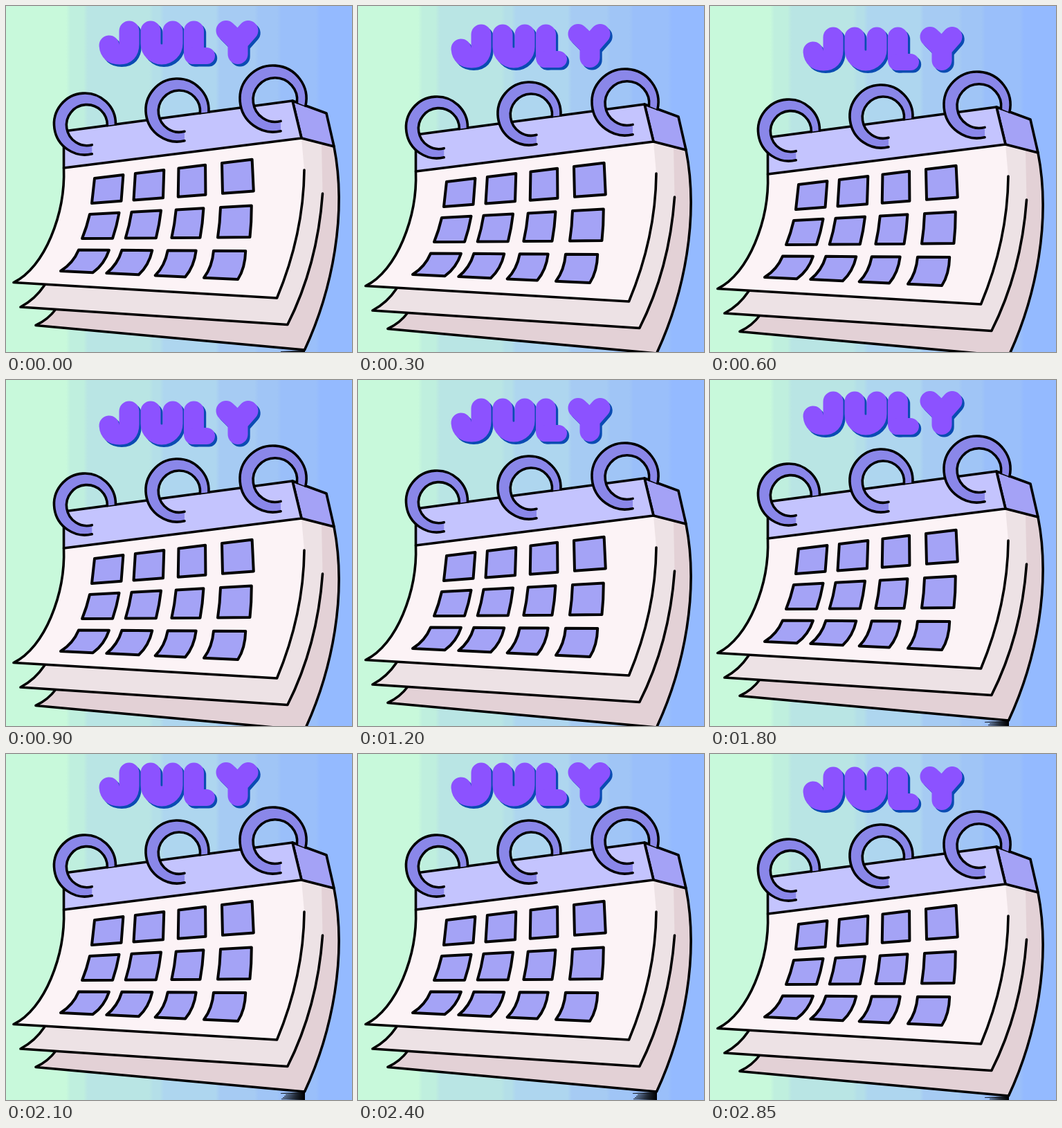
An HTML page that plays this animation: 500 by 500 pixels, repeating every 3 s.

```html
<!DOCTYPE html>
<html lang="en">
<head>
<meta charset="utf-8">
<title>July calendar</title>
<style>
html, body { margin: 0; width: 100%; height: 100%; overflow: hidden; }
svg { display: block; width: 100vw; height: 100vh; }
.ink { stroke: #000; stroke-width: 3.6; stroke-linejoin: round; stroke-linecap: round; }
.line { fill: none; }
.thick { stroke-width: 4; }
.word { fill: none; stroke-width: 29; stroke-linecap: round; stroke-linejoin: round; }
</style>
</head>
<body>
<svg viewBox="0 0 500 500" role="img" aria-label="July calendar">
  <defs>
    <linearGradient id="sky"></linearGradient>
    <g id="july" class="word">
      <path d="M178 36V55Q178 70 164 70Q150 70 149 57"/>
      <path d="M209 36V54A16 16 0 0 0 241 54V36"/>
      <path d="M271.500 36V69.500"/>
      <path d="M270 72H290" stroke-width="24"/>
      <path d="M318 35.500L335 52.500L350 35.500M335 52V69.500"/>
    </g>
  </defs>
  <rect width="500" height="500" fill="url(#sky)"/>
  <g id="art">
    <use href="#july" x="3.200" y="3.500" stroke="#0a4cb2"/>
    <use href="#july" stroke="#8c52ff"/>
    <g id="pages"></g>
    <path class="ink" fill="#a4a2f6" d="M414 137L463 155L474 203L427 191Z"/>
    <path class="ink" fill="#c4c4fe" d="M83.500 181L414 137L427 191L83.500 234Z"/>
    <g id="cells" class="ink thick" fill="#a4a3f6"></g>
    <g id="rings"></g>
    <g id="smear"></g>
  </g>
</svg>
<script>
const LOOP = 3000, STEP = 150, SWING = 9.3;
const byId = id => document.getElementById(id);

function add(parent, attrs, tag = 'path') {
  const el = document.createElementNS('http://www.w3.org/2000/svg', tag);
  for (const k in attrs) el.setAttribute(k, attrs[k]);
  byId(parent).appendChild(el);
}

// Flat colour bands, each blending briefly into the next.
const bands = [
  [90, '#c8f9db'], [115, '#bfefde'], [210, '#b9e5e4'], [225, '#b4dfe8'],
  [306, '#aed6ef'], [362, '#a6cbf3'], [395, '#a0c5f6'], [451, '#9abffa'], [500, '#94baff']
];
let from = 0;
for (const [to, color] of bands) {
  add('sky', { offset: (from + 3) / 500, 'stop-color': color }, 'stop');
  add('sky', { offset: (to - 3) / 500, 'stop-color': color }, 'stop');
  from = to;
}

// A page: its inked outline, then the hidden top corner that closes the fill.
function page(fill, outline, corner) {
  add('pages', { d: `${outline}L${corner}Z`, fill });
  add('pages', { d: outline, class: 'ink line' });
}
page('#e3d1d6', 'M474 203C493 300 472 410 431.500 497L43 461.500Q61 453 72 438', '427 191');
page('#ede2e5', 'M457.500 271Q450 375 406.800 460.500L21 435Q42 424 56 403', '427 191L456 199');
page('#fcf3f6', 'M431 237Q430 330 391.500 422L11 399.500C56 378 86 300 83.500 234', '427 191');

// Cells hang between two slanted edges: [x, y, span, slope].
const rows = [
  [[128, 249, 184, -.12], [124, 285, 189, -.075]],
  [[121, 301, 189, -.053], [110, 336, 196, -.008]],
  [[105, 352.5, 195, .006], [79, 383, 207, .047]]
];
const columns = [[0, .225], [.32, .545], [.66, .87], [1, 1.237]];
const at = ([x, y, span, slope], u) => [x + span * u, y + span * u * slope];

rows.forEach(([top, bottom], row) => {
  const side = (p, q) => {
    const cx = (p[0] + q[0]) / 2 + 1.25 * row * row;
    const cy = (p[1] + q[1]) / 2 + row * row;
    return `Q${cx} ${cy} ${q}`;
  };
  for (const [l, r] of columns) {
    const [a, b, c, d] = [at(top, l), at(top, r), at(bottom, r), at(bottom, l)];
    add('cells', { d: `M${a}L${b}${side(b, c)}L${d}${side(d, a)}Z` });
  }
});

// Top edge of the binding, bent at the corner.
const ridge = x => x < 414 ? 181 - (x - 84) / 7.5 : 137 + (x - 414) * .37;

// An open ring runs from its lower end round to where it meets the ridge.
function ring(x, y, R) {
  const end = x + .23 * R, cx = x + 2.9, cy = y + 1.6, r = .663 * R;
  const low = (x, y, r) => y + Math.sqrt(r * r - (end - x) ** 2);
  const meet = (x, y, r) => {
    const cut = ridge(x + r);
    return `${x + Math.sqrt(r * r - (cut - y) ** 2)} ${cut}`;
  };
  const out = `M${end} ${low(x, y, R)}A${R} ${R} 0 1 1 ${meet(x, y, R)}`;
  const back = `${meet(cx, cy, r)}A${r} ${r} 0 1 0 ${end} ${low(cx, cy, r)}`;
  add('rings', { d: `${out}L${back}Z`, fill: '#8a87e9' });
  add('rings', { d: `${out}M${back}`, class: 'ink line' });
}
ring(114, 170.5, 44.5);
ring(247.5, 150.5, 45.5);
ring(386, 134, 48);

// Ragged streaks under the lower corner.
for (let i = 0; i < 6; i++) {
  const y = 499 + i * 2, x = 397 + (i * 7) % 9;
  add('smear', { d: `M${x} ${y}L432 ${y - 1}V${y + 1.2}L${x} ${y + .8}Z` });
}

function draw(ms) {
  const t = Math.floor((ms % LOOP) / STEP) * STEP;
  const y = Math.round(SWING * Math.sin(2 * Math.PI * t / LOOP));
  byId('art').setAttribute('transform', `translate(0 ${y})`);
}

const start = performance.now();
function tick() {
  draw(performance.now() - start);
  requestAnimationFrame(tick);
}
draw(0);
requestAnimationFrame(tick);
</script>
</body>
</html>
```
